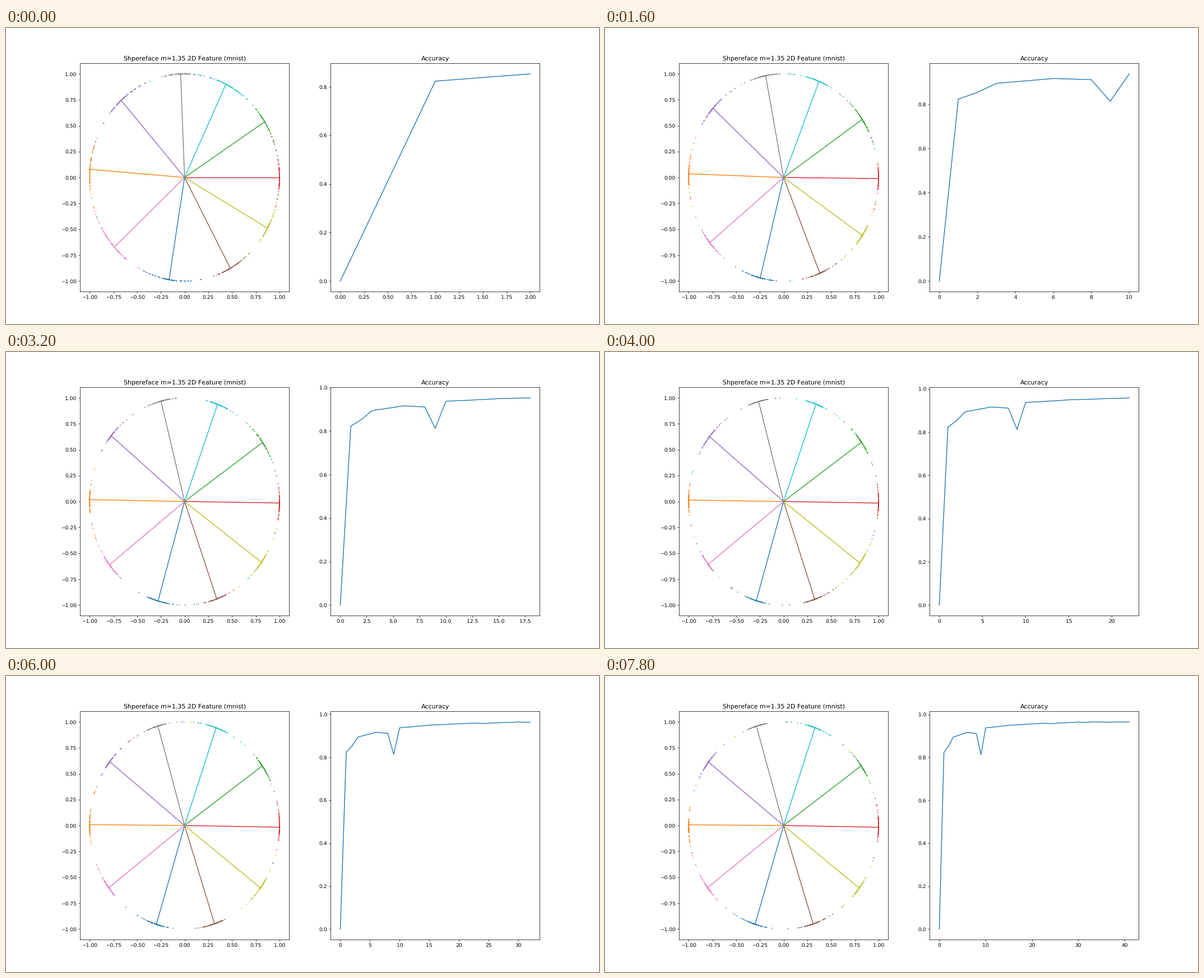
Animation of 1058 by 529 pixels, one loop 8 s. Source, as a matplotlib script:

```python
import numpy as np
import matplotlib.pyplot as plt
from matplotlib.animation import FuncAnimation

plt.rcParams["text.hinting"] = "none"
plt.rcParams["text.kerning_factor"] = 6

FRAMES, INTERVAL = 40, 200
CLASSES, POINTS, STRAYS = 10, 72, 16

# Spoke directions in degrees, before and after training
START = np.array([-99.4, 175.5, 32.5, 0, 131.9, -61.2, 222.2, 92.4, -29.3, 64.2])
END = np.array([-107.6, 179.7, 35.2, -1, 142.4, -72, 216.8, 106.8, -37.3, 70.8])


def accuracy_curve():
    """Fast rise, one dip, then a slow climb with slight noise."""
    epochs = np.arange(FRAMES + 2)
    knots = [0, 1, 2, 3, 6, 8, 9, 10, 15, 20, 30, 41]
    values = [0, .823, .853, .894, .916, .911, .813, .937, .949, .956, .963, .9655]
    noise = np.random.default_rng(1).normal(0, .0007, len(epochs))
    return np.interp(epochs, knots, values) + noise * (epochs > 10)


def on_circle(degrees):
    a = np.radians(degrees)
    return np.column_stack([np.cos(a), np.sin(a)])


def spoke_angles(step):
    return END + (START - END) * np.exp(-step / 9)


def feature_angles(step, centers):
    """Clusters around the spokes that tighten with training."""
    rng = np.random.default_rng(100 + step)
    scale = 3.2 + 2.6 * np.exp(-step / 8)
    size = (CLASSES, POINTS)
    tails = rng.choice([1, 2.6], size, p=[.85, .15])
    clusters = centers[:, None] + rng.normal(0, scale, size) * tails
    # Ambiguous samples fall between neighbouring spokes
    ring = np.sort(centers % 360)
    gaps = (ring + np.append(ring[1:], ring[0] + 360)) / 2
    strays = rng.choice(gaps, STRAYS) + rng.normal(0, 5, STRAYS)
    return np.concatenate([clusters.ravel(), strays])


fig, (ax_feat, ax_acc) = plt.subplots(1, 2, figsize=(16, 8), dpi=66.125)
fig.subplots_adjust(left=.125, right=.9, bottom=.11, top=.88, wspace=.2)

ax_feat.set_title("Shpereface m=1.35 2D Feature (mnist)")
ax_feat.set(xlim=(-1.1, 1.1), ylim=(-1.1, 1.1))
ax_acc.set_title("Accuracy")

labels = np.concatenate([
    np.repeat(np.arange(CLASSES), POINTS),
    np.random.default_rng(4).integers(0, CLASSES, STRAYS),
])
dots = ax_feat.scatter(np.zeros(len(labels)), np.zeros(len(labels)),
                       s=1, c=[f"C{i}" for i in labels])
spokes = [ax_feat.plot([], [], color=f"C{i}")[0] for i in range(CLASSES)]
curve, = ax_acc.plot([], [], color="C0")
accuracy = accuracy_curve()


def update(step):
    centers = spoke_angles(step)
    for line, (x, y) in zip(spokes, on_circle(centers)):
        line.set_data([0, x], [0, y])
    dots.set_offsets(on_circle(feature_angles(step, centers)))

    count = step + 3
    curve.set_data(np.arange(count), accuracy[:count])
    ax_acc.relim()
    ax_acc.autoscale_view()
    return [dots, curve, *spokes]


anim = FuncAnimation(fig, update, frames=FRAMES, interval=INTERVAL,
                     init_func=lambda: update(0), repeat=True,
                     repeat_delay=0, blit=False)
plt.show()
```
